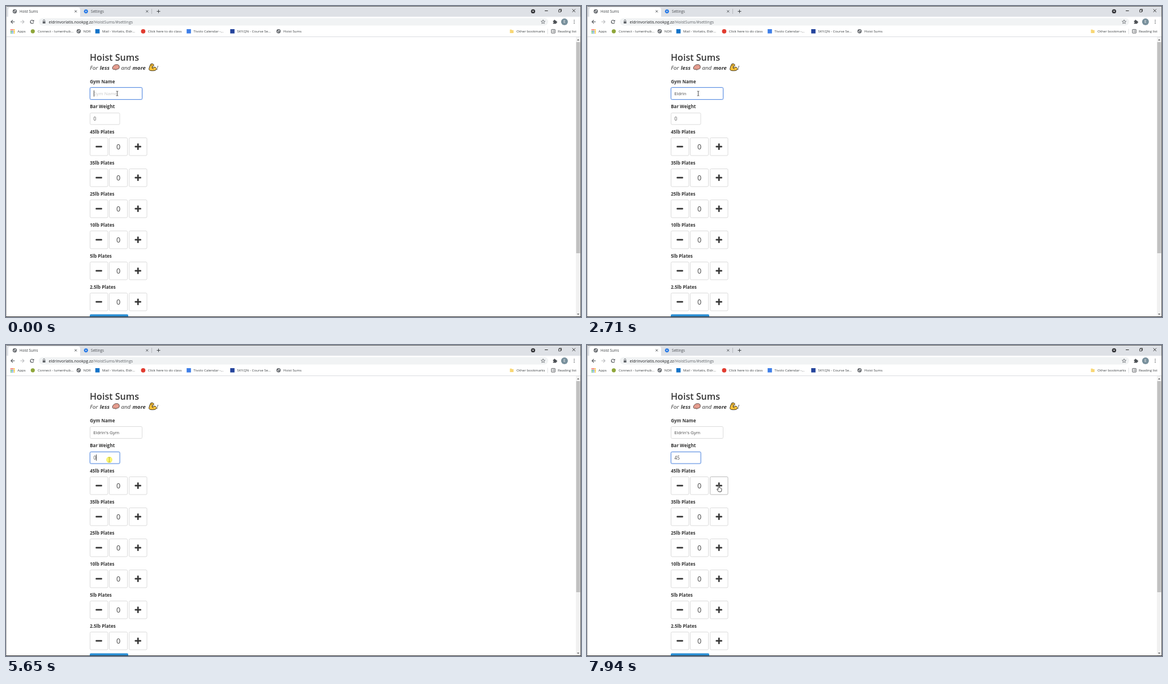
Recreate the animation shown at these times as an HTML page with a canvas. Size 1016 by 551 pixels, loop 8000 ms.

```html
<!DOCTYPE html>
<html lang="en">
<head>
<meta charset="utf-8">
<title>Hoist Sums</title>
<style>
html, body { margin: 0; width: 100%; height: 100%; overflow: hidden; background: #fff; }
canvas { display: block; width: 1016px; height: 551px; }
</style>
</head>
<body>
<canvas id="stage" width="1016" height="551"></canvas>
<script>
const ctx = document.getElementById('stage').getContext('2d');
const FONT = '"Open Sans", "Noto Sans", sans-serif';
const INK = '#363636', ICON = '#5f6368', LOOP = 8000, BLINK = 530;
const NAME = "Eldrin's Gym";
const NAME_KEYS = [1120, 1450, 1650, 1780, 2050, 2180, 3040, 3170, 3500, 4100, 4300, 4500];
const FOCUS_BAR = 5640;

function text(str, x, y, size, color = INK, style = '', align = 'left') {
  ctx.font = `${style} ${size}px ${FONT}`;
  ctx.fillStyle = color;
  ctx.textAlign = align;
  ctx.fillText(str, x, y);
  return ctx.measureText(str).width;
}

function rect(x, y, w, h, color) {
  ctx.fillStyle = color;
  ctx.fillRect(x, y, w, h);
}

function paint(fill, stroke, width = 1) {
  if (fill) { ctx.fillStyle = fill; ctx.fill(); }
  if (stroke) { ctx.strokeStyle = stroke; ctx.lineWidth = width; ctx.stroke(); }
}

function round(x, y, w, h, r, fill, stroke, width = 1) {
  ctx.beginPath();
  ctx.roundRect(x, y, w, h, r);
  paint(fill, stroke, width);
}

function disc(x, y, r, fill, stroke, width) {
  ctx.beginPath();
  ctx.arc(x, y, r, 0, 7);
  paint(fill, stroke, width);
}

function shape(d, x, y, fill, stroke, width = 1, skew = 0) {
  const p = new Path2D(d);
  ctx.save();
  ctx.transform(1, 0, skew, 1, x, y);
  if (fill) { ctx.fillStyle = fill; ctx.fill(p); }
  if (stroke) { ctx.strokeStyle = stroke; ctx.lineWidth = width; ctx.stroke(p); }
  ctx.restore();
}

function cross(x, y, r, color = '#3c4043') {
  shape(`M${-r} ${-r}L${r} ${r}M${r} ${-r}L${-r} ${r}`, x, y, null, color, 0.9);
}

function globe(x, y) {
  disc(x, y, 3.7, ICON);
  shape('M-2.6 -.8L-.6 0L-.2 1.4L-1 2.6ZM0 -2.7L2.3 -1.4L1 .2L-.3 -.7ZM1.2 1L2.5 .8L1.4 2.3Z', x, y, '#eee');
}

function tabs() {
  rect(0, 0, 1016, 19, '#dee1e6');
  round(4, 2.5, 127, 20, 4, '#fff');
  globe(15.5, 9.5);
  text('Hoist Sums', 24, 11.8, 6.2, '#3c4043');
  cross(123.2, 9.5, 1.9);
  for (let i = 0; i < 8; i++) {
    const a = i * Math.PI / 4;
    disc(141.3 + 2.9 * Math.cos(a), 9.5 + 2.9 * Math.sin(a), 0.9, '#1a73e8');
  }
  disc(141.3, 9.5, 2.1, null, '#1a73e8', 1.7);
  text('Settings', 150, 11.8, 6.2, '#4a4d51');
  cross(249.3, 9.5, 1.9);
  rect(257, 5, 0.6, 9, '#9a9da2');
  shape('M-3 0H3M0 -3V3', 269.5, 9.5, null, '#3c4043', 1);
  disc(931.3, 9.4, 3.7, '#35363a');
  shape('M-1.7 -.8H1.7L0 1.3Z', 931.3, 9.4, '#fff');
  rect(952, 8, 5.5, 1, '#222');
  shape('M-2.5 -1.3H1.3V2.5H-2.5ZM-1.3 -1.3V-2.5H2.5V1.3H1.3', 979, 8.2, null, '#222', 0.8);
  cross(1003.3, 8.3, 2.6, '#222');
}

function toolbar() {
  rect(0, 19, 1016, 36, '#fff');
  shape('M3.4 0H-3M0 -3.2L-3.2 0L0 3.2', 12, 28, null, '#4d5155', 1.1);
  shape('M-3.4 0H3M0 -3.2L3.2 0L0 3.2', 28.8, 28, null, '#babcbe', 1.1);
  ctx.beginPath();
  ctx.arc(46, 28, 2.9, 0.3, 5.4);
  paint(null, '#4d5155', 1.1);
  shape('M3.5 -3.5V-.4H.4Z', 46, 28, '#4d5155');

  round(58, 21.5, 900, 13, 6.5, '#f1f3f4');
  round(64.8, 27.2, 4.8, 3.9, 0.5, ICON);
  shape('M-1.4 0V-1.3A1.4 1.4 0 0 1 1.4 -1.3V0', 67.2, 27, null, ICON, 0.9);
  const w = text('eldrinvorlatis.nookpg.zz', 75.5, 30.7, 7.05, '#202124');
  text('/HoistSums/#settings', 75.5 + w, 30.7, 7.05, ICON);

  let star = '';
  for (let i = 0; i < 10; i++) {
    const a = i * Math.PI / 5 - Math.PI / 2, r = i % 2 ? 1.6 : 3.7;
    star += `${i ? 'L' : 'M'}${r * Math.cos(a)} ${r * Math.sin(a)}`;
  }
  shape(star + 'Z', 949, 28.2, null, ICON, 0.8);
  round(966.6, 26, 5.8, 5.6, 0.7, '#4d5155');
  disc(969.3, 25.7, 1.3, '#4d5155');
  disc(972.6, 28.6, 1.3, '#4d5155');
  disc(966.8, 29, 0.9, '#fff');
  disc(986.8, 28, 6, '#78909c');
  text('E', 986.8, 30.4, 6.4, '#fff', '', 'center');
  for (let i = -1; i < 2; i++) disc(1004, 28 + i * 2.7, 0.8, '#4d5155');
}

function bookmarks() {
  const dots = ['#ea4335', '#ea4335', '#fbbc04', '#34a853', '#4285f4', '#fbbc04', '#34a853', '#4285f4', '#fbbc04'];
  dots.forEach((c, i) => rect(8.2 + i % 3 * 2.7, 41.3 + Math.floor(i / 3) * 2.7, 1.9, 1.9, c));
  disc(47.3, 44.8, 3.6, '#8fa63a');
  globe(128.4, 44.8);
  rect(157.8, 41, 7.6, 7.6, '#1473c8');
  disc(242.4, 44.8, 3.9, '#e13c30');
  rect(319.2, 41, 7.6, 7.6, '#3f7fe8');
  rect(396.2, 41, 7.6, 7.6, '#24449c');
  globe(481.6, 44.8);
  const items = [['Apps', 20.3], ['Connect - lumenhub...', 56], ['NDR', 136.8], ['Mail - Vorlatis, Eldr...', 170],
    ['Click here to do class', 250.7], ['Tivolo Calendar -...', 331.3], ['SKY.QN - Course Se...', 408.3],
    ['Hoist Sums', 490], ['Other bookmarks', 902], ['Reading list', 975]];
  for (const [label, x] of items) text(label, x, 47.1, 6.15, '#3c4043');
  shape('M-3.2 -3H-.4L.5 -2H3.2V3.2H-3.2Z', 893.6, 44.8, '#f8d775');
  rect(956.7, 40.5, 0.6, 9, '#c8cacc');
  round(963.7, 41.5, 6.6, 6.6, 0.6, null, '#4d5155', 0.9);
  shape('M-1.8 -1.4H-.8M-1.8 0H-.8M-1.8 1.4H-.8M.1 -1.4H2M.1 0H2M.1 1.4H2', 967, 44.8, null, '#4d5155', 0.7);
  rect(0, 54, 1016, 1, '#dadce0');
}

function heading() {
  text('Hoist Sums', 148, 96.6, 16.1, INK, '600');
  const y = 112.5, lean = -0.22;
  text('For', 148.3, y, 9.8, INK, 'italic');
  text('less', 165.8, y, 9.5, INK, 'italic 700');
  text('and', 203.5, y, 9.6, INK, 'italic');
  text('more', 223.5, y, 9.5, INK, 'italic 700');
  text('!', 266.3, y, 9.8, INK, 'italic');
  // brain
  shape('M-5.8 1.8C-6.6 -2 -4 -4.8 0 -4.8C4 -4.8 6.4 -2 5.6 1.8C5 3.2 3.5 3.4 2.5 3.2C2 5 -1 4.8 -1.5 3.4C-3.5 4.2 -5.3 3.6 -5.8 1.8Z',
    194.4, 108.6, '#eda597', '#33231f', 0.8, lean);
  shape('M-4 -.3C-2 -3 -1 0 .5 -2.5M1.6 -.5C3 -2 4 -.2 5 -.6M-3 2C-1 1 1 2.6 2.5 1.5', 194.4, 108.6, null, '#b56d62', 0.5, lean);
  // flexed arm
  shape('M2 -6C4.5 -6.8 7.5 -6 7.8 -3.6C7.8 -2 6.3 -1.6 5.3 -1.7L6 1.2C8.5 -1.5 12.5 -.7 14.2 3C14 5.4 10.5 6.2 7 6C3.5 6 .8 5 .7 3C.6 0 1 -3.5 2 -6Z',
    252.6, 108.7, '#fcc33c', '#2b2412', 0.9, lean);
  shape('M2.5 -3.6H5.3M6 1.2C6.6 2.3 7.8 2.8 9 2.6', 252.6, 108.7, null, '#2b2412', 0.7, lean);
}

function field(x, y, w, h, focus, border = '#dbdbdb') {
  if (focus) round(x - 0.2, y - 0.2, w + 0.4, h + 0.4, 2.3, null, 'rgba(50,115,220,.2)', 2.2);
  round(x, y, w, h, 2, '#fff', focus ? '#5c8fe2' : border);
}

function plates(hover) {
  ['45', '35', '25', '10', '5', '2.5'].forEach((lb, i) => {
    const y = 233.5 + i * 55, mid = y + 15.7;
    text(lb + 'lb Plates', 148.2, y - 7.5, 8, INK, '700');
    field(148.5, y, 31.5, 31.5);
    field(182.5, y, 32, 31.5);
    field(217.5, y, 31.5, 31.5, false, hover && !i ? '#bababa' : '#dbdbdb');
    round(158.4, mid - 1.35, 11.4, 2.7, 0.8, INK);
    round(227.5, mid - 1.35, 11.4, 2.7, 0.8, INK);
    round(231.85, mid - 5.7, 2.7, 11.4, 0.8, INK);
    text('0', 198.6, mid + 5.2, 12.6, '#444', '', 'center');
  });
  round(148, 546.3, 68, 20, 2, '#2b8ed3');
}

function scrollbar() {
  rect(1007, 55, 8, 496, '#f1f1f1');
  rect(1007.5, 64, 7, 374, '#c1c1c1');
  shape('M-2 1L0 -1.2L2 1Z', 1011, 60, '#606060');
  shape('M-2 -1L0 1.2L2 -1Z', 1011, 546, '#606060');
}

function caret(x, y, age) {
  if (age % (2 * BLINK) < BLINK) rect(Math.round(x), y, 1, 11, '#444');
}

const lastOf = (times, t) => times.filter(v => v <= t).pop();

function form(t) {
  const inBar = t >= FOCUS_BAR;
  text('Gym Name', 148.2, 136.9, 8, INK, '700');
  field(148.5, 144.5, 92, 21, !inBar);
  const typed = NAME.slice(0, NAME_KEYS.filter(v => v <= t).length);
  const w = text(typed, 154.3, 158.4, 7.95, '#4a4a4a');
  if (!typed) text('Gym Name', 154.3, 158.4, 8, '#c8c8c8');
  if (!inBar) caret(154.5 + w, 149.5, t - lastOf([-270, 390, ...NAME_KEYS], t));

  text('Bar Weight', 148.2, 181.4, 8, INK, '700');
  field(148.5, 189.5, 52.5, 20.5, inBar);
  const value = t < 6400 ? '0' : t < 6720 ? '' : t < 7050 ? '4' : '45';
  const vw = text(value, 154.4, 203, 8.3, '#4a4a4a');
  if (!value) text('Bar Weight', 154.4, 203, 7.6, '#c8c8c8');
  if (inBar) caret(154.4 + vw, 194, t - lastOf([FOCUS_BAR, 6720, 7050], t + 25));
}

function glide(t, start, end, a, b) {
  const u = Math.min(1, Math.max(0, (t - start) / (end - start)));
  const e = u * u * (3 - 2 * u);
  return [a[0] + (b[0] - a[0]) * e, a[1] + (b[1] - a[1]) * e];
}

function pointer(t) {
  const step = Math.floor(t / 66) * 66;
  if (t < 5780) return glide(step, 5100, 5560, [196.5, 155], [182.5, 203.3]);
  if (t < 5910) return [182.5, 203.3];
  return glide(step, 7410, 7900, [180.5, 203.5], [232.3, 249]);
}

function drawPointer(x, y, hand) {
  const inField = (y > 144 && y < 166) || (y > 189 && y < 210 && x < 201);
  if (hand) {
    shape('M0 0C.9 -.9 1.8 -.3 1.8 .6V4C2.8 3.4 3.3 4 3.4 4.5C4.2 4 4.8 4.5 4.9 5.1C5.6 4.9 5.9 5.4 5.9 6V8.3L4.9 11H.6L-2.3 7.2C-2.5 6 -1.4 5.8 -.2 7.2Z',
      x - 0.3, y, '#fff', '#111', 0.8);
  } else if (inField) {
    shape('M-1.8 -4H-.4L0 -3.6L.4 -4H1.8M0 -3.6V3.6M-1.8 4H-.4L0 3.6L.4 4H1.8', x, y, null, '#222', 0.8);
  } else {
    shape('M0 0V9L2.1 7.1L3.6 10.3L5 9.6L3.5 6.5H6.3Z', x, y, '#fff', '#111', 0.8);
  }
}

function windowEdge() {
  rect(0, 0, 1016, 1, '#626262');
  rect(1015, 0, 1, 551, '#626262');
  rect(0, 0, 1, 551, '#b4b4b4');
  rect(0, 550, 1016, 1, '#333');
}

function draw(t) {
  const [x, y] = pointer(t);
  const hand = y > 233 && x > 217;
  const pressed = (t >= 260 && t < 390) || (t >= FOCUS_BAR && t < 5780);
  rect(0, 0, 1016, 551, '#fff');
  tabs();
  toolbar();
  bookmarks();
  heading();
  form(t);
  plates(hand);
  scrollbar();
  drawPointer(x, y, hand);
  if (pressed) disc(x, y, 5.5, 'rgba(246,238,40,.65)');
  windowEdge();
}

const began = performance.now();
function tick() {
  draw((performance.now() - began) % LOOP);
  requestAnimationFrame(tick);
}
tick();
</script>
</body>
</html>
```
